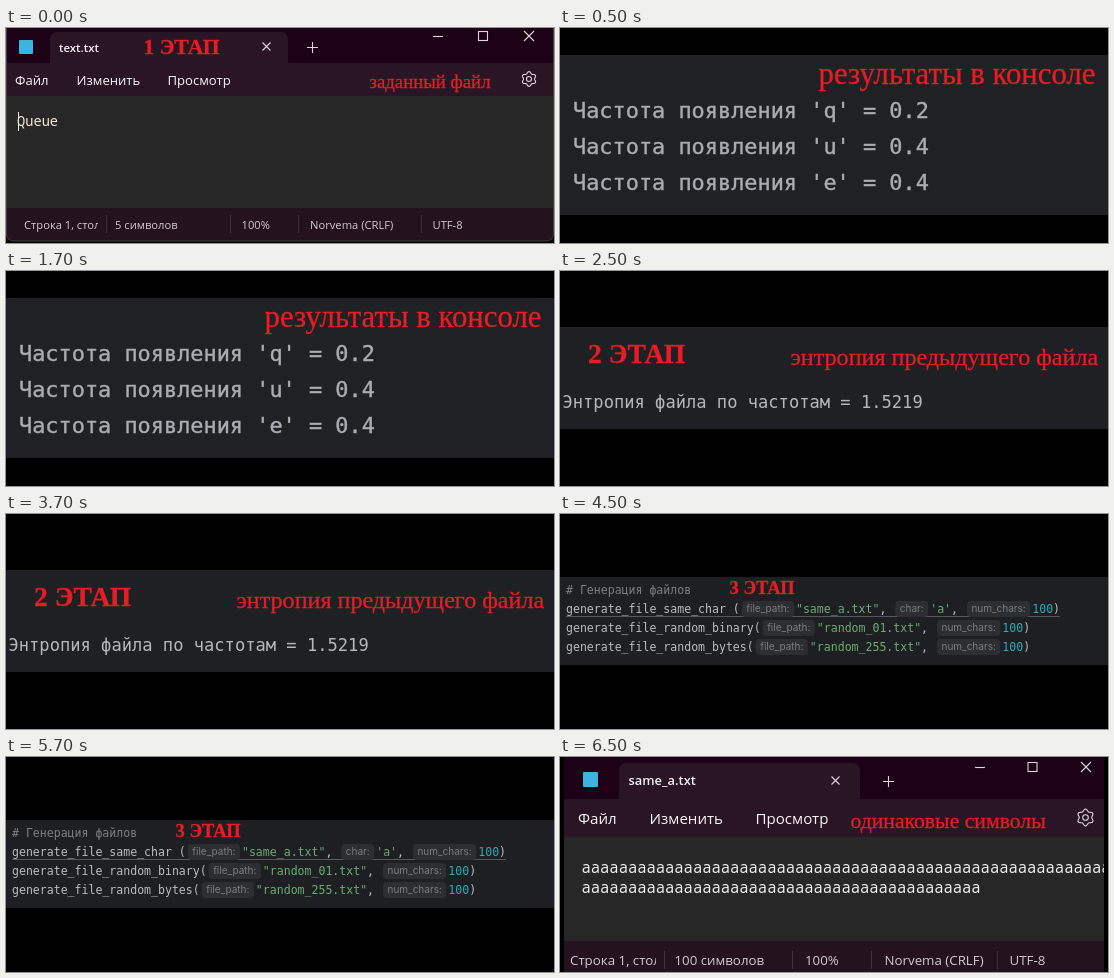
Write an HTML page with a canvas that moves like this. It is 548x215 px and loops after 8 s.

```html
<!DOCTYPE html>
<html lang="ru">
<head>
<meta charset="utf-8">
<title>Энтропия файла</title>
<style>
  html, body { margin: 0; width: 100%; height: 100%; overflow: hidden; background: #000; }
  canvas { display: block; width: 548px; height: 215px; }
</style>
</head>
<body>
<canvas id="stage"></canvas>
<script>
const W = 548, H = 215, LOOP = 8000;
const UI = '"Open Sans", "Noto Sans", sans-serif';
const SERIF = '"Liberation Serif", "Noto Serif", serif';
const CODE = '"DejaVu Sans Mono", monospace';
const EDIT = '"Noto Sans Mono", monospace';
const HINT = 'Inter, sans-serif';
const RED = '#e81c24';

const canvas = document.getElementById('stage');
const ctx = canvas.getContext('2d');
const dpr = window.devicePixelRatio || 1;
canvas.width = W * dpr;
canvas.height = H * dpr;

function rect(x, y, w, h, color) {
  ctx.fillStyle = color;
  ctx.fillRect(x, y, w, h);
}

function round(x, y, w, h, r, color) {
  ctx.fillStyle = color;
  ctx.beginPath();
  ctx.roundRect(x, y, w, h, r);
  ctx.fill();
}

function text(str, x, y, size, family, color, weight = 400, edge = 0) {
  ctx.font = `${weight} ${size}px ${family}`;
  ctx.fillStyle = color;
  ctx.fillText(str, x, y);
  if (edge) {
    ctx.strokeStyle = color;
    ctx.lineWidth = edge;
    ctx.strokeText(str, x, y);
  }
}

const note = (str, x, y, size, weight = 400) => text(str, x, y, size, SERIF, RED, weight, 0.3);

function line(...p) {
  ctx.beginPath();
  for (let i = 0; i < p.length; i += 4) {
    ctx.moveTo(p[i], p[i + 1]);
    ctx.lineTo(p[i + 2], p[i + 3]);
  }
  ctx.stroke();
}

const cross = (x, y, r) => line(x - r, y - r, x + r, y + r, x - r, y + r, x + r, y - r);
const plus = (x, y, r) => line(x - r, y, x + r, y, x, y - r, x, y + r);

function clipped(x, y, w, h, draw) {
  ctx.save();
  ctx.beginPath();
  ctx.rect(x, y, w, h);
  ctx.clip();
  draw();
  ctx.restore();
}

function gear(x, y, r) {
  ctx.beginPath();
  for (let i = 0; i < 72; i++) {
    const a = i / 72 * Math.PI * 2;
    const d = r * (0.88 + 0.13 * Math.cos(6 * a));
    ctx.lineTo(x + d * Math.sin(a), y + d * Math.cos(a));
  }
  ctx.closePath();
  ctx.stroke();
  ctx.beginPath();
  ctx.arc(x, y, r * 0.34, 0, Math.PI * 2);
  ctx.stroke();
}

function editor(o) {
  const [tabX, tabY, tabR] = o.tab;
  const w = o.right - o.left;
  rect(o.left, 0, w, o.bottom, '#1d0217');
  rect(o.left, o.menuTop, w, o.bodyTop - o.menuTop, '#2a1525');
  round(tabX, tabY, tabR - tabX, o.menuTop - tabY + 1, [7, 7, 0, 0], '#2a1525');
  rect(o.left, o.bodyTop, w, o.statusTop - o.bodyTop, '#272727');
  round(o.left, o.statusTop, w, o.bottom - o.statusTop, [0, 0, o.corner, o.corner], '#25121f');
  round(...o.icon, 1, '#3cb4e0');

  text(o.name, ...o.namePos, o.nameSize, UI, '#f4f0f3', 600);
  ctx.strokeStyle = '#dcd6da';
  ctx.lineWidth = 1.1;
  cross(...o.close, 4);
  plus(...o.add, 5.5);
  const [minX, maxX, exitX, y] = o.controls;
  line(minX - 5, y + 0.5, minX + 5, y + 0.5);
  ctx.strokeRect(maxX - 4.5, y - 4.5, 9, 9);
  cross(exitX, y, 5);
  gear(...o.gear);

  ['Файл', 'Изменить', 'Просмотр'].forEach((s, i) =>
    text(s, o.menuX[i], o.menuY, o.menuSize, UI, '#f8f5f7', 500));

  const status = ['Строка 1, столбец 1', o.count, '100%', 'Norvema (CRLF)', 'UTF-8'];
  status.forEach((s, i) => {
    const draw = () => text(s, o.statusX[i], o.statusY, o.statusSize, UI, '#d2cad0', 500);
    if (i) draw();
    else clipped(o.statusX[0], o.statusTop, o.statusClip - o.statusX[0], 40, draw);
  });
  for (const x of o.bars) rect(x, o.statusY - 14, 1, 18, '#40303b');
}

function queueFile() {
  editor({
    left: 0, right: 547, bottom: 213, corner: 7, menuTop: 35, bodyTop: 68, statusTop: 180,
    tab: [44, 4, 282], icon: [13, 12, 14, 14],
    name: 'text.txt', namePos: [53, 24], nameSize: 11.4,
    close: [260.5, 18.5], add: [306.5, 19.5], controls: [432, 477, 523, 8],
    gear: [523, 51, 7.3],
    menuX: [9, 70.5, 161.5], menuY: 57, menuSize: 13.1,
    count: '5 символов', statusX: [18, 109, 235.5, 304, 426.5],
    statusY: 201, statusSize: 11.2, statusClip: 92, bars: [100, 224, 292, 415]
  });
  ctx.strokeStyle = '#453f43';
  ctx.lineWidth = 1;
  ctx.beginPath();
  ctx.roundRect(0.5, -10, 547, 223, 7);
  ctx.stroke();
  text('Queue', 11, 98, 13.7, EDIT, '#f3ead8', 500);
  rect(12, 84, 1, 19, '#e8e8e8');
  note('1 ЭТАП', 137.5, 26, 21.6, 700);
  note('заданный файл', 363.5, 60, 18.8);
}

function frequencies() {
  rect(0, 27, W, 160, '#1f2125');
  note('результаты в консоле', 258.5, 56, 30.8);
  [['q', '0.2'], ['u', '0.4'], ['e', '0.4']].forEach(([c, f], i) =>
    text(`Частота появления '${c}' = ${f}`, 13, 90 + i * 36, 21.9, CODE, '#a9adb3', 400, 0.4));
}

function entropy() {
  rect(0, 56, W, 102, '#1f2023');
  note('2 ЭТАП', 28, 92, 27.6, 700);
  note('энтропия предыдущего файла', 230.5, 94, 24.1);
  text('Энтропия файла по частотам = 1.5219', 2.5, 137, 17.1, CODE, '#b4b7bc');
}

// Draws a run of code; parts starting with "~" become parameter hints.
function codeRow(y, ...parts) {
  const size = 11.55;
  let x = 6;
  for (const part of parts) {
    if (part[0] === '~') {
      const label = part.slice(1);
      ctx.font = `10px ${HINT}`;
      const w = ctx.measureText(label).width;
      round(x + 2, y - 12, w + 9, 16, 4, '#2c2e32');
      text(label, x + 6.5, y - 1, 10, HINT, '#797d84');
      x += w + 13;
    } else {
      const color = /^["']/.test(part) ? '#6aab73' : /^\d/.test(part) ? '#2aacb8' : '#b9bcc2';
      text(part, x, y, size, CODE, color);
      x += ctx.measureText(part).width;
    }
  }
}

function generation() {
  rect(0, 63, W, 88, '#1e1f22');
  text('# Генерация файлов', 6, 80, 11.55, CODE, '#7a7e85');
  note('3 ЭТАП', 169.5, 80, 18.5, 700);
  rect(6, 102, 494, 1, '#55575c');
  codeRow(99, 'generate_file_same_char (', '~file_path:', '"same_a.txt"', ', ',
    '~char:', "'a'", ', ', '~num_chars:', '100', ')');
  codeRow(118, 'generate_file_random_binary(', '~file_path:', '"random_01.txt"', ', ',
    '~num_chars:', '100', ')');
  codeRow(137, 'generate_file_random_bytes(', '~file_path:', '"random_255.txt"', ', ',
    '~num_chars:', '100', ')');
}

function sameFile() {
  editor({
    left: 4, right: 544, bottom: 215, corner: 0, menuTop: 42, bodyTop: 80, statusTop: 184,
    tab: [59, 6, 300], icon: [23, 15, 15, 15],
    name: 'same_a.txt', namePos: [68.5, 28], nameSize: 12.9,
    close: [275.5, 23.5], add: [328.5, 24.5], controls: [420, 472.5, 526, 10],
    gear: [525.5, 60.5, 8.3],
    menuX: [18, 89.5, 195.5], menuY: 67, menuSize: 15.1,
    count: '100 символов', statusX: [10, 114.5, 245, 324.5, 449.5],
    statusY: 208, statusSize: 13.3, statusClip: 96, bars: [104, 232, 311, 437]
  });
  clipped(4, 80, 540, 104, () => {
    text('a'.repeat(57), 21.5, 116, 15.47, EDIT, '#f0f0f0', 500);
    text('a'.repeat(43), 21.5, 136, 15.47, EDIT, '#f0f0f0', 500);
  });
  note('одинаковые символы', 290.5, 71, 21.7);
}

const scenes = [[6500, sameFile], [4500, generation], [2500, entropy], [500, frequencies], [0, queueFile]];
const start = performance.now();

function frame() {
  const t = (performance.now() - start) % LOOP;
  ctx.setTransform(dpr, 0, 0, dpr, 0, 0);
  rect(0, 0, W, H, '#000');
  scenes.find(([from]) => t >= from)[1]();
  requestAnimationFrame(frame);
}
frame();
</script>
</body>
</html>
```
